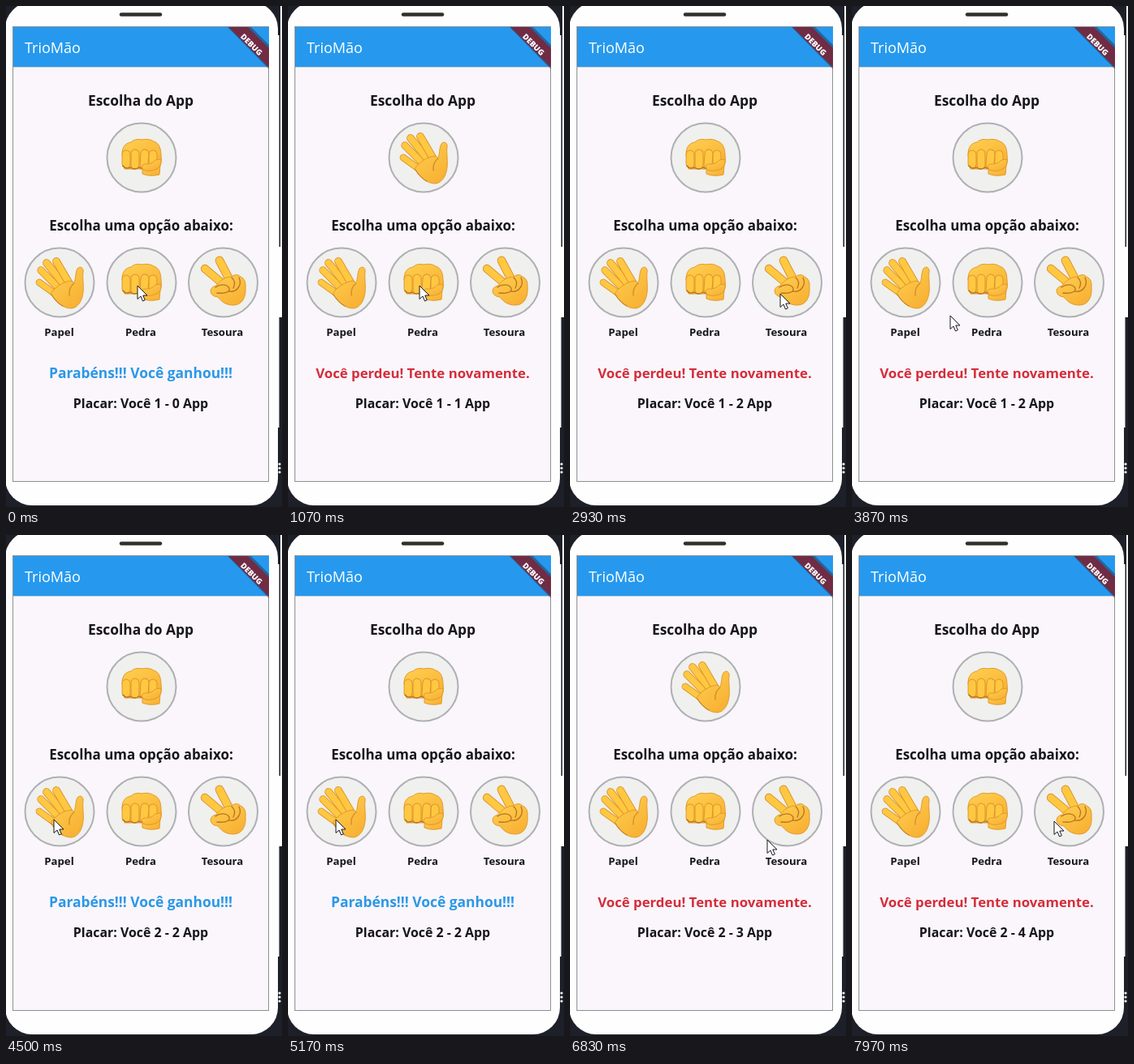
These frames come from a looping animation (340 px wide and 618 px high, 8 s). An HTML page:

```html
<!DOCTYPE html>
<html lang="pt">
<head>
<meta charset="utf-8">
<title>Papel, pedra e tesoura</title>
<style>
  html, body { margin: 0; width: 100%; height: 100%; overflow: hidden; background: #1d2029; }
  svg { display: block; width: 340px; height: 618px; }
  text { font-family: "Open Sans", "Noto Sans", sans-serif; font-weight: 700; fill: #16161a; text-anchor: middle; }
  .button { fill: #f0f0ee; stroke: #aeb0b4; stroke-width: 2; }
  .label { font-size: 13.2px; }
  .edge { fill: none; stroke: #dc9030; stroke-linecap: round; }
  .skin { fill: none; stroke: #ffc840; stroke-linecap: round; }
  .shape { fill: url(#skin); stroke: #e29a2c; stroke-width: 1; }
  .crease { fill: none; stroke: #b87324; stroke-width: 1.3; stroke-linecap: round; }
</style>
</head>
<body>
<svg viewBox="0 0 340 618">
  <defs>
    <linearGradient id="skin" x1="0" y1="0" x2=".7" y2="1">
      <stop offset="0" stop-color="#ffd050"/>
      <stop offset="1" stop-color="#f8b134"/>
    </linearGradient>
    <clipPath id="bar"><rect x="9" y="26" width="315" height="70"/></clipPath>

    <g id="paper">
      <g data-fingers="-25,0 0,18 7; -23,-15 4,12 7.5; -16,-24 9,7 8; -4,-26 13,3 8"></g>
      <path class="shape" stroke="none" d="M-11 14 C-7 7 4-1 14-2 C17 0 18 1 19-3 C20-9 20-14 22-17 C25-21 30-18 29-13 C28-7 30 4 29 12 C28 22 23 31 15 32 C3 32-4 24-11 14Z"/>
      <path class="crease" opacity=".65" d="M18 1 Q11 6 12 16 M-10 15 Q-4 25 4 29"/>
    </g>

    <g id="rock">
      <path class="shape" d="M1 12 V20 Q10 24 22 21 L23 9Z"/>
      <path class="shape" d="M-24-4 C-24-13-20-18-13-19 Q-8-24 0-22 Q9-24 15-20 C22-18 24-10 24-3 C25 6 24 11 19 14 H-21Z"/>
      <g data-fingers="14,-4 14,8 9; 4,-5 3,9 9; -8,-5 -8,9 9; -19,-4 -19,8 9"></g>
      <path class="crease" d="M-23 10 Q-19 15-14 12 Q-9 16-3 12 Q2 15 5 12"/>
      <path class="shape" d="M24 2 Q25 12 17 15 Q8 18 2 15 Q-2 10 3 8 Q12 9 17 3Z"/>
    </g>

    <g id="scissors">
      <g data-fingers="-22,-17 4,5 8.5; -4,-27 9,-2 9"></g>
      <path class="shape" d="M-8 4 C-4-2 3-7 11-7 Q17-12 22-7 Q29-4 28 6 C29 18 24 28 13 28 C3 28-2 23-6 18 Q-15 17-15 10 Q-14 5-8 4Z"/>
      <path class="crease" d="M-9 6 Q-2 1 5 4 Q10 7 7 11 Q3 14-7 13 M11-6 Q17-1 13 7 M20-6 Q24 2 17 9 M8 11 Q14 12 18 8"/>
    </g>
  </defs>

  <!-- Desktop behind the phone -->
  <rect width="340" height="618" fill="#1d2029"/>
  <path fill="#fefefe" d="M338 0H340V384H338Z M336 297H340V384H336Z"/>
  <g fill="#fff"><circle cx="337" cy="565" r="1.6"/><circle cx="337" cy="570" r="1.6"/><circle cx="337" cy="575" r="1.6"/></g>

  <!-- Phone -->
  <rect x="-1" y="-5" width="336" height="621" rx="33" fill="#fefefe"/>
  <path d="M335 36V520" stroke="#fefefe" stroke-width="3"/>
  <path d="M142 10.5H190" stroke="#2f3029" stroke-width="4.5" stroke-linecap="round"/>
  <rect x="8.5" y="25.5" width="315" height="561" fill="#faf6fc" stroke="#8e9093"/>
  <g clip-path="url(#bar)">
    <rect x="9" y="75" width="315" height="1" fill="#c9cdd6"/>
    <rect x="9" y="26" width="315" height="49" fill="#2699ee"/>
    <path d="M271 24H300L326 50V80Z" fill="#203450" opacity=".5"/>
    <path d="M274 26H298L324 52V76Z" fill="#702c44"/>
    <text transform="translate(300 50) rotate(45)" style="font-size:9.6px;font-weight:800;fill:#fff">DEBUG</text>
  </g>
  <text x="23" y="58" style="font-size:18px;font-weight:400;fill:#fff;text-anchor:start">TrioMão</text>

  <text x="166" y="123" font-size="17.4">Escolha do App</text>
  <circle class="button" cx="167" cy="187" r="42.5"/>
  <use id="choice" x="167" y="187"/>
  <text x="166.5" y="277" font-size="16.95">Escolha uma opção abaixo:</text>

  <circle class="button" cx="66" cy="341" r="42.5"/>
  <circle class="button" cx="167" cy="341" r="42.5"/>
  <circle class="button" cx="267.5" cy="341" r="42.5"/>
  <use href="#paper" x="66" y="341"/>
  <use href="#rock" x="167" y="341"/>
  <use href="#scissors" x="267" y="341"/>
  <text class="label" x="65.5" y="407">Papel</text>
  <text class="label" x="166" y="407">Pedra</text>
  <text class="label" x="266.5" y="407">Tesoura</text>

  <text id="result" x="166" y="459"></text>
  <text id="score" x="166" y="496" font-size="15.9"></text>

  <path id="cursor" d="M0 0V16.5L4 13L6.5 19L9.3 17.8L6.8 12H12Z" fill="#fff" stroke="#18181c" stroke-linejoin="round"/>
</svg>
<script>
const LOOP = 8000;
const byId = id => document.getElementById(id);

// Rounds: start time, app's hand, player's points, app's points, player won
const rounds = [
  [0, "rock", 1, 0, true],
  [1050, "paper", 1, 1, false],
  [2400, "rock", 1, 2, false],
  [4450, "rock", 2, 2, true],
  [6000, "paper", 2, 3, false],
  [7350, "rock", 2, 4, false]
];

// Pointer path: time, x, y
const stops = [
  [0, 162, 345], [1450, 162, 345], [1870, 190, 412], [2250, 259, 355],
  [3300, 259, 355], [3870, 121, 382], [4200, 59, 351], [5350, 59, 351],
  [5800, 163, 347], [6450, 163, 347], [6830, 243, 376], [7100, 249, 353], [LOOP, 249, 353]
];

// Each finger: tip, root and width
for (const group of document.querySelectorAll("[data-fingers]")) {
  group.innerHTML = group.dataset.fingers.split(";").map(finger => {
    const [tip, root, width] = finger.trim().split(" ");
    const line = (name, w) => `<path class="${name}" d="M${tip}L${root}" stroke-width="${w}"/>`;
    return line("edge", +width + 1.8) + line("skin", width);
  }).join("");
}

const slope = (i, axis) => (stops[i + 1][axis] - stops[i][axis]) / (stops[i + 1][0] - stops[i][0]);

// The pointer passes through a stop at speed, but rests where it turns back or waits
function speed(i, axis) {
  if (i === 0 || i === stops.length - 1) return 0;
  const before = slope(i - 1, axis), after = slope(i, axis);
  return before * after > 0 ? 2 * before * after / (before + after) : 0;
}

function pointerAt(time) {
  const next = stops.findIndex(stop => stop[0] > time);
  const from = stops[next - 1], to = stops[next];
  const span = to[0] - from[0];
  const p = (time - from[0]) / span, q = 1 - p;
  return [1, 2].map(axis => Math.round(
    from[axis] * q * q * (1 + 2 * p) + to[axis] * p * p * (1 + 2 * q) +
    span * p * q * (speed(next - 1, axis) * q - speed(next, axis) * p)
  ));
}

let shown;
function draw() {
  const time = performance.now() % LOOP;
  const round = rounds.findLast(r => r[0] <= time);
  if (round !== shown) {
    shown = round;
    const [, hand, you, app, won] = round;
    byId("choice").setAttribute("href", "#" + hand);
    byId("result").textContent = won ? "Parabéns!!! Você ganhou!!!" : "Você perdeu! Tente novamente.";
    byId("result").style.fill = won ? "#2b98e6" : "#d42d3a";
    byId("result").style.fontSize = won ? "17.4px" : "16.8px";
    byId("score").textContent = `Placar: Você ${you} - ${app} App`;
  }
  byId("cursor").setAttribute("transform", `translate(${pointerAt(time)})`);
  requestAnimationFrame(draw);
}
draw();
</script>
</body>
</html>
```
